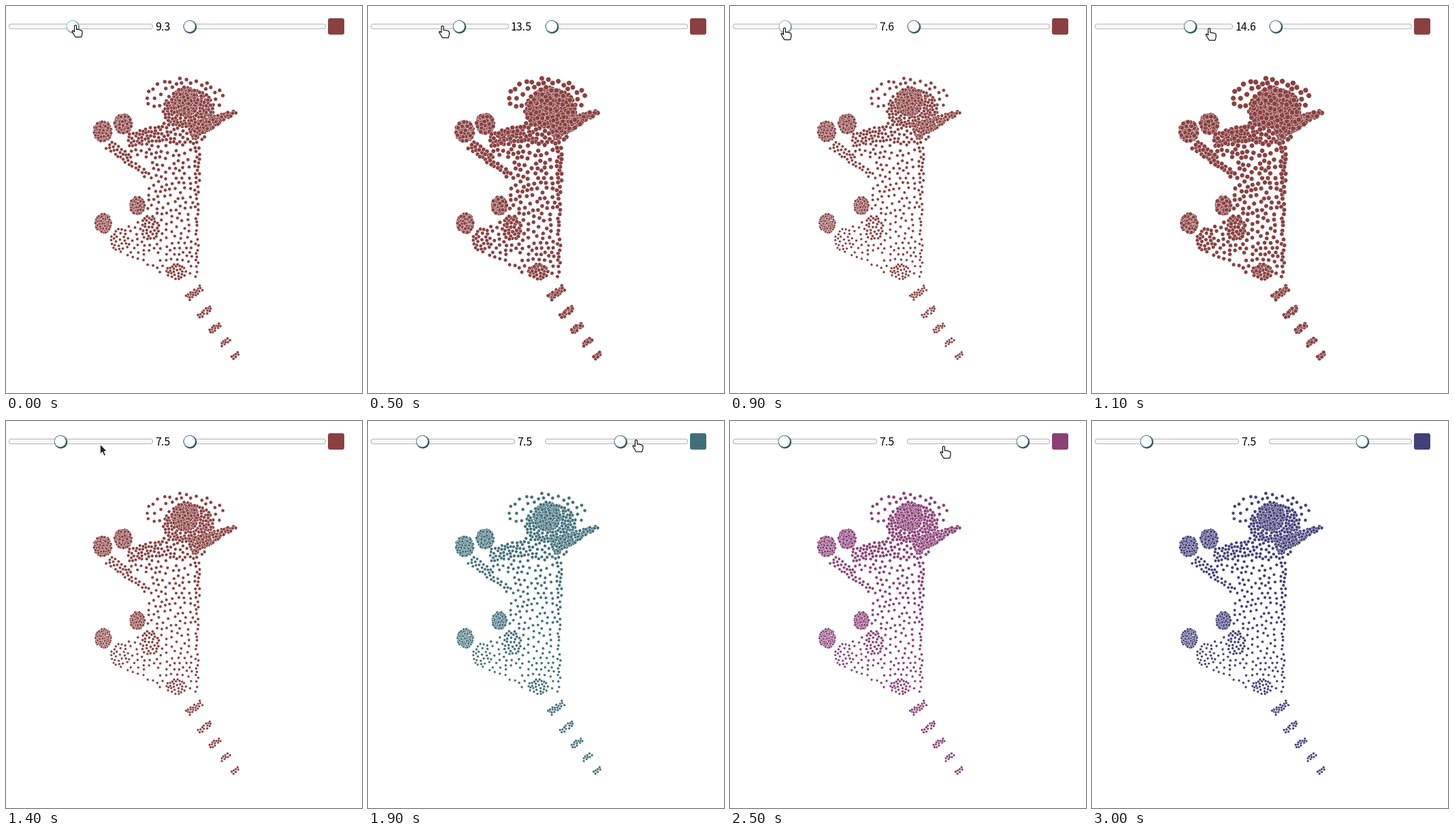
These frames come from a looping animation (523x568 px, 3300 ms). A matplotlib script:

```python
import colorsys
import numpy as np
import matplotlib.pyplot as plt
from matplotlib.animation import FuncAnimation
from matplotlib.patches import Circle, FancyBboxPatch, Polygon
from matplotlib.path import Path

W, H, DPI = 523, 568, 100
PT = 72 / DPI  # points per pixel
STEPS, STEP_MS = 33, 100
rng = np.random.default_rng(11)
dots = []


def pack(outline, gap, tries=2500):
    """Scatter dots inside an outline, roughly gap apart from all others."""
    spots = rng.uniform(outline.min(0), outline.max(0), (tries, 2))
    for spot in spots[Path(outline).contains_points(spots)]:
        room = gap * rng.uniform(.75, 1.1)
        if not dots or np.hypot(*(np.array(dots) - spot).T).min() > room:
            dots.append(spot)


def blob(cx, cy, rx, ry, gap):
    a = np.linspace(0, 2 * np.pi, 40)
    pack(np.c_[cx + rx * np.cos(a), cy + ry * np.sin(a)], gap)


def limb(start, end, w0, w1, gap):
    """Tapered limb; w0 and w1 are half widths at its ends."""
    start, end = np.array(start, float), np.array(end, float)
    dx, dy = (end - start) / np.hypot(*(end - start))
    side = np.array([-dy, dx])
    pack(np.array([start + side * w0, end + side * w1,
                   end - side * w1, start - side * w0]), gap)


def build_cloud():
    # head with its loose fringe, snout and neck
    blob(263, 140, 20, 21, 2.9)
    limb((270, 185), (338, 155), 13, 2, 3.1)
    blob(268, 151, 38, 29, 4.1)
    blob(262, 134, 57, 28, 9)
    blob(261, 182, 35, 22, 6)
    # paws
    blob(142, 184, 13, 14.5, 2.5)
    blob(172, 173, 12.5, 13.5, 2.5)
    blob(193, 293, 10.5, 13, 2.5)
    blob(143, 319, 11.5, 14, 2.5)
    # arm
    limb((152, 203), (208, 249), 8, 4, 5)
    limb((178, 197), (230, 187), 9, 13, 5)
    limb((176, 208), (228, 212), 11, 12, 8)
    # hip, knee and seat, then the body around them
    blob(211, 326, 14, 18, 5)
    blob(250, 390, 16, 11, 4.3)
    blob(168, 344, 14, 17, 5.5)
    limb((281, 208), (280, 402), 4, 2, 6)
    limb((252, 195), (241, 365), 36, 40, 8)
    limb((243, 362), (262, 400), 40, 15, 8)
    limb((156, 341), (206, 346), 11, 34, 7.5)
    # tail pieces shrink towards the tip
    for t in np.linspace(0, 1, 5):
        center = np.array([277 + 60 * t, 421 + 92 * t ** .85])
        reach = np.array([1, -.75]) * (10 - 5 * t)
        limb(center - reach, center + reach, 4.5 - 2 * t, 4 - 2 * t, 3.7)


build_cloud()
x, y = np.array(dots).T
dot_scale = np.interp(y, [110, 410], [.192, .138]) - .02 * np.clip((220 - x) / 80, 0, 1)

fig = plt.figure(figsize=(W / DPI, H / DPI), dpi=DPI, facecolor="white")
ax = fig.add_axes([0, 0, 1, 1])
ax.set(xlim=(0, W), ylim=(H, 0))
ax.axis("off")


def rounded(x0, y0, w, h, radius, **style):
    return ax.add_patch(FancyBboxPatch(
        (x0, y0), w, h, boxstyle=f"round,pad=0,rounding_size={radius}", **style))


def track(x0, width):
    return rounded(x0, 26.5, width, 7, 3.4, fc="#f6f6f6", ec="#b2b4b4", lw=PT)


class Thumb:
    """Round slider handle, lit from the upper left; paler under the pointer."""

    def __init__(self):
        self.shade, self.rim, self.face = (
            ax.add_patch(Circle((0, 0), r, ec="none", zorder=4)) for r in (9.5, 9.1, 8))
        self.face.set_facecolor("white")

    def place(self, cx, hover):
        self.shade.center = cx + .6, 30.8
        self.rim.center = cx - .2, 30
        self.face.center = cx - .3, 29.9
        self.shade.set_facecolor("#7f9ba6" if hover else "#26404a")
        self.rim.set_facecolor("#8dbccd" if hover else "#4b8299")


size_track = track(4.5, 211)
track(260.5, 209)
size_thumb, hue_thumb = Thumb(), Thumb()
label = ax.text(241, 36, "", family="Noto Sans CJK JP", size=16 * PT,
                ha="right", va="baseline", color="black")
swatch = rounded(473, 18, 24, 24, 3, ec="none")
cloud = ax.scatter(x, y, s=1, ec="white", lw=.45 * PT)

HAND = np.array([(-1.5, 1), (0, 0), (1.5, 1), (1.5, 6.5), (4.5, 6.5), (9, 7.8), (10, 9.3),
                 (10, 13), (8.6, 17.6), (0, 17.6), (-5, 9.4), (-4, 8), (-1.5, 10)])
ARROW = np.array([(0, 0), (0, 14.5), (3.3, 11.4), (5.6, 17.2), (8, 16.2), (5.6, 10.6),
                  (10, 10.6)])
hand = ax.add_patch(Polygon(HAND, fc="white", ec="black", lw=1.1 * PT, zorder=6))
arrow = ax.add_patch(Polygon(ARROW, fc="#222222", ec="white", lw=.8 * PT, zorder=6))


def ease(step, *keys):
    """Smooth motion through (step, value) keys."""
    value = keys[0][1]
    for (s0, v0), (s1, v1) in zip(keys, keys[1:]):
        if step > s0:
            u = min((step - s0) / (s1 - s0), 1)
            value = v0 + (v1 - v0) * u * u * (3 - 2 * u)
    return value


def size_at(step):
    """Start value, fall from a peak, then a second swell."""
    if step <= 3:
        return 9.3
    if step < 10:
        return 7.6 + 9.2 * max(0, (9 - step) / 5) ** 2
    return 7.5 + 10 * np.sin(np.pi * min((step - 10) / 4, 1))


def size_width(size):
    return 211 if size < 9.95 else 202  # the longer label shortens the track


def size_x_at(step):
    size = size_at(step)
    return 15 + (size_width(size) - 21) / 19 * (size - 1)


def hue_x_at(step):
    return ease(step, (15, 270), (21, 406), (25, 430), (26, 316), (30, 397))


def pointer_at(step):
    """The pointer runs one step ahead of the handle that it drags."""
    py = ease(step, (3, 28), (9, 32), (14, 34), (21, 26), (25, 37), (28, 27), (30, -30))
    if step <= 3:
        px = size_x_at(step) + 4
    elif step <= 13:
        px = size_x_at(step + 1)
    elif step < 16:
        px = ease(step, (13, size_x_at(14)), (16, hue_x_at(17)))
    else:
        px = hue_x_at(step + 1) - 2
    return px, py


def slider_color(cx):
    pure = colorsys.hsv_to_rgb((cx - 270) / 190, 1, 1)
    return (64 + np.array(pure) * (74, 58, 58)) / 255


def update(step):
    size, size_x, hue_x = size_at(step), size_x_at(step), hue_x_at(step)
    px, py = pointer_at(step)

    label.set_text(f"{size:.1f}")
    size_track.set_width(size_width(size))
    for thumb, cx in ((size_thumb, size_x), (hue_thumb, hue_x)):
        thumb.place(cx, abs(px - cx) < 10 and py > 15)

    color = slider_color(hue_x)
    swatch.set_facecolor(color)
    cloud.set_facecolor(color)
    cloud.set_sizes((2 * dot_scale * (size + 6) * PT) ** 2)

    travelling = 13 < step < 16
    hand.set_visible(not travelling)
    arrow.set_visible(travelling)
    hand.set_xy(HAND + (px, py))
    arrow.set_xy(ARROW + (px, py))
    return [label, swatch, cloud, hand, arrow]


anim = FuncAnimation(fig, update, frames=STEPS, interval=STEP_MS, repeat=True,
                     repeat_delay=0, blit=False)
plt.show()
```
